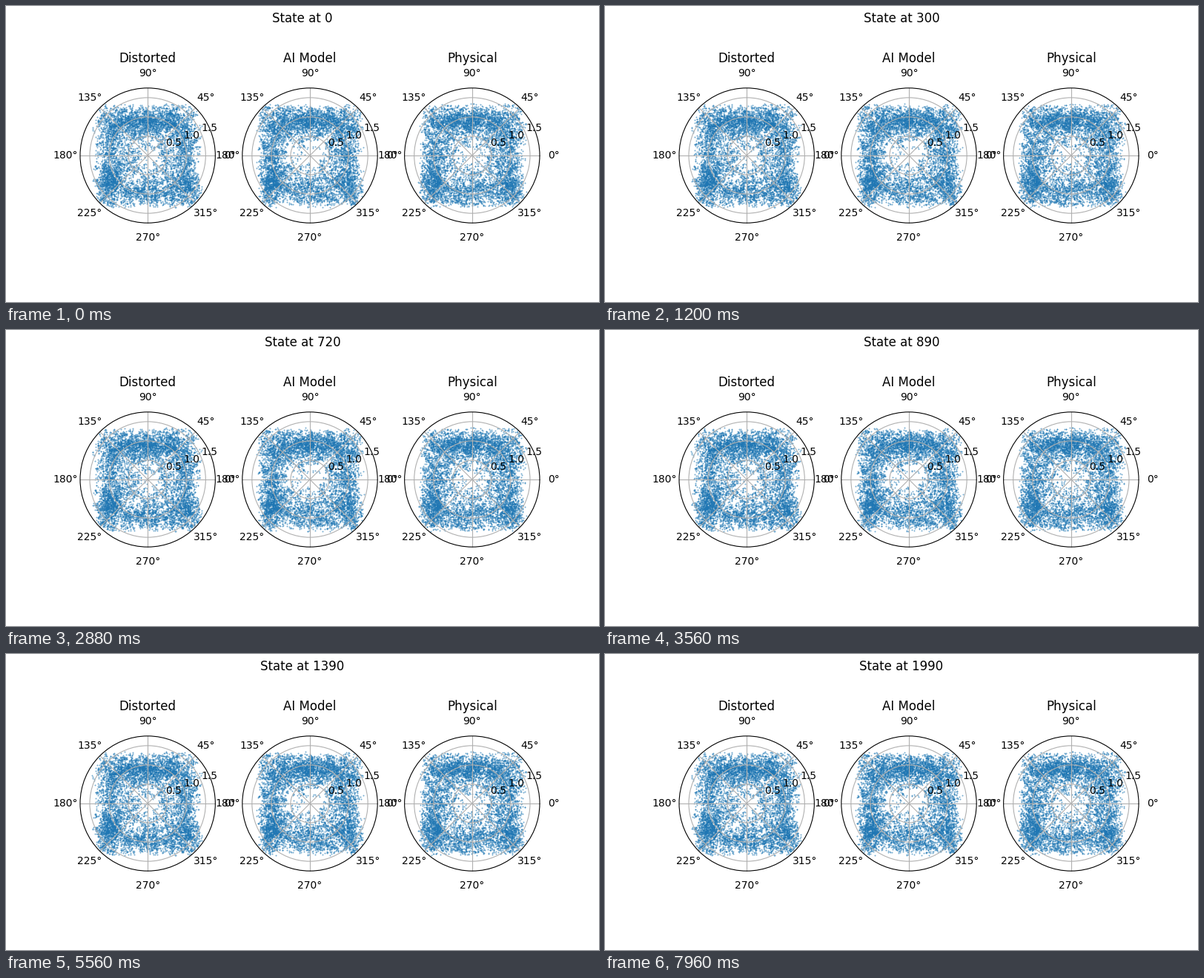
These frames come from a looping animation (800x400 px, 8000 ms). A matplotlib script:

```python
import numpy as np
import matplotlib.pyplot as plt
from matplotlib.animation import FuncAnimation
from matplotlib.patches import Circle

W, H, DPI = 800, 400, 100
FRAMES, INTERVAL = 200, 40
BLUE, GRID = "#1f77b4", "#b0b0b0"

RADIUS = 620 / 3.4 / 2
UNIT = RADIUS / 1.75
PITCH = RADIUS * 2.4
CX0, CY = 100 + RADIUS, 198
LABEL_R = RADIUS + 14 * DPI / 72

fig = plt.figure(figsize=(W / DPI, H / DPI), dpi=DPI)
ax = fig.add_axes([0, 0, 1, 1])
ax.set_xlim(0, W)
ax.set_ylim(0, H)
ax.axis("off")


def field(rng, n, soft, hole):
    """Loose square of points that thins out towards the centre."""
    pts = rng.uniform(-1.27, 1.27, (n, 2)) + rng.normal(0, soft, (n, 2))
    r = np.hypot(*pts.T)
    return pts[rng.random(n) < np.clip((r - hole) / 0.5, 0, 1)]


def ring(rng, n, size, spread):
    """Band of points around a rounded square."""
    a = rng.uniform(0, 2 * np.pi, n)
    c, s = np.cos(a), np.sin(a)
    r = size * (np.abs(c) ** 3.5 + np.abs(s) ** 3.5) ** (-1 / 3.5)
    r += rng.normal(0, spread, n)
    return np.column_stack([r * c, r * s])


def blob(rng, n, x, y, sx, sy):
    return np.column_stack([rng.normal(x, sx, n), rng.normal(y, sy, n)])


def make_cloud(seed, soft, hole):
    rng = np.random.default_rng(seed)
    seeds = np.vstack([
        field(rng, 1500, soft, hole),
        ring(rng, 620, 0.95, 0.13),
        blob(rng, 190, -1.02, -0.75, 0.14, 0.25),
        blob(rng, 130, 1.0, -0.85, 0.15, 0.2),
        blob(rng, 180, -0.05, 0.87, 0.4, 0.13),
        blob(rng, 80, -0.8, 0.85, 0.25, 0.2),
        blob(rng, 80, 0.7, 0.85, 0.25, 0.2),
    ])
    # every seed grows into a small clump
    pts = np.repeat(seeds, 3, axis=0)
    pts += rng.normal(0, 0.035, pts.shape)
    limit = np.array([1.36 + soft, 1.34])
    pts = pts[np.all(np.abs(pts) < limit, axis=1)]
    pts = pts[(np.hypot(*pts.T) < 1.72) & (np.hypot(*pts.T) > hole)]
    phase = rng.uniform(0, 2 * np.pi, pts.shape)
    cycles = rng.integers(1, 13, pts.shape)
    return pts, phase, cycles


def draw_panel(cx, title):
    for r in (0.5, 1.0, 1.5):
        ax.add_patch(Circle((cx, CY), r * UNIT, fill=False, ec=GRID, lw=0.8, zorder=2))
        a = np.pi / 8
        ax.text(cx + r * UNIT * np.cos(a), CY + r * UNIT * np.sin(a), f"{r}",
                ha="left", va="bottom", fontsize=10, zorder=4)
    for deg in range(0, 360, 45):
        c, s = np.cos(np.radians(deg)), np.sin(np.radians(deg))
        ax.plot([cx, cx + RADIUS * c], [CY, CY + RADIUS * s], color=GRID, lw=0.8, zorder=2)
        ax.text(cx + LABEL_R * c, CY + LABEL_R * s, f"{deg}°",
                ha="center", va="center", fontsize=10, zorder=4)
    ax.add_patch(Circle((cx, CY), RADIUS, fill=False, ec="black", lw=0.8, zorder=3))
    ax.text(cx, 324, title, ha="center", va="baseline", fontsize=12, zorder=4)


panels = []
for i, (title, soft, hole) in enumerate([("Distorted", 0.08, 0.05),
                                         ("AI Model", 0.05, 0.14),
                                         ("Physical", 0.05, 0.08)]):
    cx = CX0 + i * PITCH
    draw_panel(cx, title)
    dots = ax.scatter([], [], s=0.1, c=BLUE, linewidths=0.9, zorder=1)
    panels.append((cx, dots, make_cloud(11 + i, soft, hole)))

heading = fig.suptitle("State at 0")


def update(frame):
    heading.set_text(f"State at {frame * 10}")
    turn = 2 * np.pi * frame / FRAMES
    for cx, dots, (pts, phase, cycles) in panels:
        moved = pts + 0.005 * np.sin(cycles * turn + phase)
        dots.set_offsets(moved * UNIT + (cx, CY))
    return [heading] + [dots for _, dots, _ in panels]


anim = FuncAnimation(fig, update, frames=FRAMES, interval=INTERVAL, repeat=True, repeat_delay=0)
plt.show()
```
